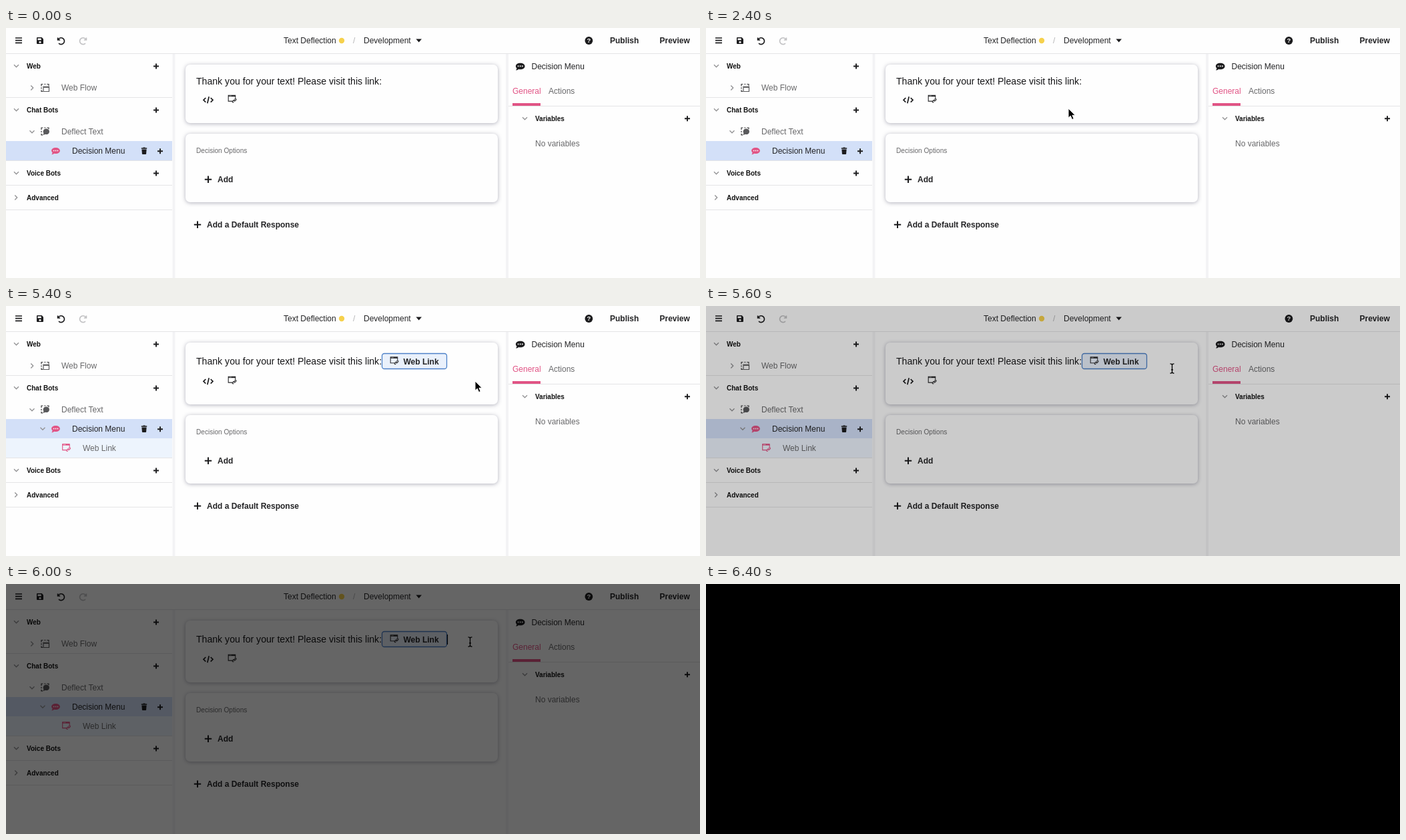
An HTML page for the animation above (6600 ms loop, 1040 by 376 pixels).

```html
<!DOCTYPE html>
<html lang="en">
<head>
<meta charset="utf-8">
<title>Bot builder</title>
<style>
html, body { margin: 0; width: 100%; height: 100%; overflow: hidden; background: #fefefe; }
svg { display: block; width: 1040px; height: 376px; font-family: "Liberation Sans", Arial, sans-serif; font-size: 12px; cursor: default; }
text { fill: #242426; white-space: pre; }
.b { font-weight: bold; }
.s { font-size: 10px; font-weight: bold; fill: #111; }
.g { fill: #68686a; }
.line { stroke: #e4e4e6; }
.card { fill: #fefefe; filter: drop-shadow(0 1px 3px rgba(40, 40, 70, .36)); }
</style>
</head>
<body>
<svg viewBox="0 0 1040 376">
  <defs>
    <g id="plus" fill="none" stroke="#1c1c1e" stroke-width="1.9"><path d="M-4 0H4M0-4V4"/></g>
    <g id="bigplus" fill="none" stroke="#1c1c1e" stroke-width="2"><path d="M-5.2 0H5.2M0-5.2V5.2"/></g>
    <path id="down" d="M-3.5-1.7 0 1.7 3.5-1.7" fill="none" stroke="#949496" stroke-width="1.4"/>
    <path id="right" d="M-1.7-3.5 1.7 0-1.7 3.5" fill="none" stroke="#949496" stroke-width="1.4"/>
    <g id="chat">
      <path d="M0-5C3.7-5 6.4-3.1 6.4-.5S3.7 4 0 4q-1.3 0-2.4-.3Q-4 5.2-6.3 5.2-5 3.8-4.9 2.4-6.4 1.2-6.4-.5C-6.4-3.1-3.7-5 0-5Z" fill="currentColor"/>
      <path d="M-3.7-.5h1.6M-.8-.5H.8M2.1-.5h1.6" stroke="#fff" stroke-width="1.6"/>
    </g>
    <g id="dash" fill="none" stroke="#3c3c3e" stroke-width="1.2">
      <path d="M-6-2.6V-5.5H-3.6M-1.7-5.5H.5M2.3-5.5H5V-3.3M-6-.8V1.4M-6 3.2V5.3H-3.8"/>
    </g>
    <g id="link" fill="none" stroke="currentColor" stroke-width="1.1">
      <path d="M4.7-1V-5.3H-5.8V3.6H.4"/>
      <path d="M-5.8-4.4H4.7" stroke-width="2.2"/>
      <path d="M-4.3-4.5h1M-2.5-4.5h1" stroke="#fff" stroke-width=".8"/>
      <path d="M2.4 4.9 1.3 5.4Q-.1 5.3.3 3.8L1.9 2.1Q3.1 1.2 4 2.5M3.5.8 4.5-.1Q6.1-.2 5.9 1.4L4.4 3.1Q3.1 4.1 2.2 2.8"/>
    </g>
    <path id="curve" d="M-4.4-4.6V-1H-.8M-3.9-1.3A4.9 4.9 0 1 1-3 4" fill="none" stroke="currentColor" stroke-width="1.7"/>
  </defs>

  <rect width="1040" height="376" fill="#fefefe"/>
  <path d="M251.5 39V376M751 39V376" stroke="#f3f3f5" stroke-width="4"/>

  <!-- top bar -->
  <path class="line" d="M0 38.5H1040"/>
  <path d="M14 15H24M14 18.7H24M14 22.4H24" stroke="#1c1c1e" stroke-width="1.7"/>
  <path d="M47 14H53.6L56 16.4V23q0 1-1 1H47q-1 0-1-1V15q0-1 1-1Z" fill="#1c1c1e"/>
  <path d="M47.5 15.5H52.7V18.2H47.5Z" fill="#fefefe"/><circle cx="51" cy="21.2" r="1.5" fill="#fefefe"/>
  <use href="#curve" x="82" y="19" color="#1c1c1e"/>
  <use href="#curve" transform="translate(116 19)scale(-1 1)" color="#c2c2c4"/>
  <text x="416" y="23">Text Deflection</text>
  <circle cx="503" cy="19" r="4.2" fill="#f6d14c"/>
  <text x="520" y="23" style="fill:#b4b4b6">/</text>
  <text x="536" y="23">Development</text>
  <path d="M614.4 16.5H623L618.7 21.5Z" fill="#1c1c1e"/>
  <circle cx="873.4" cy="19" r="5.9" fill="#1c1c1e"/>
  <text class="b" x="873.4" y="22.4" text-anchor="middle" style="fill:#fff;font-size:9.5px">?</text>
  <text class="b" x="905" y="23">Publish</text>
  <text class="b" x="979.5" y="23">Preview</text>

  <!-- tree -->
  <use href="#down" x="15.5" y="57"/><text class="s" x="31" y="61">Web</text><use href="#plus" x="225" y="57.5"/>
  <use href="#right" x="39" y="90"/>
  <use href="#dash" x="59" y="90"/>
  <path d="M56 88H64.5V95.5H56ZM56 89.3H64.5" fill="none" stroke="#5c5c5e" stroke-width="1.2"/>
  <text class="g" x="83" y="94">Web Flow</text>
  <path class="line" d="M0 104.5H249"/>
  <use href="#down" x="15.5" y="123"/><text class="s" x="31" y="127">Chat Bots</text><use href="#plus" x="225" y="123.5"/>
  <use href="#down" x="39" y="156"/>
  <use href="#dash" x="59" y="155.5"/>
  <path d="M60.4 151.5a4.5 4.3 0 1 1-1.8 8.2q-1.5 1.3-3.4 1.1 1-1 1.2-2.5a4.4 4.3 0 0 1 4-6.8Z" fill="#59595b"/>
  <text class="g" x="83" y="160">Deflect Text</text>
  <rect y="170" width="249" height="29" fill="#d3e0f8"/>
  <use href="#chat" x="74.5" y="185" color="#e15485"/>
  <text x="99" y="189">Decision Menu</text>
  <path d="M202.8 181H211.2M205.5 180.2H208.5" stroke="#1c1c1e" stroke-width="1.3"/>
  <path d="M203.4 182.5H210.6L210.1 189.2Q210 190 209.2 190H204.8Q204 190 203.9 189.2Z" fill="#1c1c1e"/>
  <use href="#plus" x="231" y="185.2"/>
  <g id="child">
    <use href="#down" x="55" y="184.5"/>
    <rect y="199" width="249" height="29" fill="#edf4fd"/>
    <use href="#link" x="90.5" y="213" color="#e15485"/>
    <text class="g" x="115" y="218">Web Link</text>
  </g>
  <g id="lower">
    <path class="line" d="M0 199.5H249M0 236.5H249M0 273.5H249"/>
    <use href="#down" x="15.5" y="218"/><text class="s" x="31" y="222">Voice Bots</text><use href="#plus" x="225" y="218.5"/>
    <use href="#right" x="15" y="255"/><text class="s" x="31" y="259">Advanced</text>
  </g>

  <!-- message card -->
  <rect id="card" class="card" x="269" y="55" width="468" height="88" rx="7"/>
  <text id="msg" x="285" y="85" style="font-size:14.1px;fill:#161618">Thank you for your text! Please visit this link:</text>
  <g id="chip">
    <rect x="563.5" y="71.5" width="97" height="23" rx="3.5" fill="#eaf1fc" stroke="#4c80c8" stroke-width="1.3"/>
    <use href="#link" x="582" y="82.2" color="#333335"/>
    <text class="b" x="595.5" y="88">Web Link</text>
  </g>
  <path id="caret" d="M661.5 76V91" stroke="#000" stroke-width="1.2"/>
  <g id="body">
    <rect id="hot" x="321" y="90" width="36" height="36" rx="3" fill="#f7d4e0"/>
    <path d="M299.3 105 296 108.3 299.3 111.6M306.7 105 310 108.3 306.7 111.6M304.2 103.2 301.8 113.2" fill="none" stroke="#1c1c1e" stroke-width="1.7"/>
    <use id="tool" href="#link" x="339" y="106.5"/>
    <rect class="card" x="269" y="159" width="468" height="103" rx="7"/>
    <text class="g" x="285" y="188" style="font-size:10.1px">Decision Options</text>
    <use href="#bigplus" x="303" y="227.7"/><text class="b" x="317" y="232">Add</text>
    <use href="#bigplus" x="287" y="295.7"/><text class="b" x="301" y="300">Add a Default Response</text>
  </g>

  <!-- inspector -->
  <use href="#chat" transform="translate(770.7 58)scale(1.07)" color="#1c1c1e"/>
  <text x="787.5" y="62">Decision Menu</text>
  <text x="759" y="99" style="fill:#e15485">General</text>
  <text class="g" x="813" y="99">Actions</text>
  <path class="line" d="M753 117.5H1040"/>
  <rect x="759" y="113" width="42" height="4" fill="#e15485"/>
  <use href="#down" x="777.5" y="136"/><text class="s" x="793" y="140">Variables</text><use href="#plus" x="1021" y="136.3"/>
  <text class="g" x="793" y="178">No variables</text>

  <rect id="dim" width="1040" height="376"/>

  <g id="pointer">
    <path id="arrow" d="M0 0V14.2L3.3 11.2 5.6 16.6 8.2 15.5 5.9 10.3H10.2Z" fill="#000" stroke="#fff" stroke-width="1"/>
    <path id="hand" d="M0 1.3Q.2-.4 1.6-.4 3-.3 3.1 1.2L3.6 5.2Q5.4 4 6.2 5.7 8-.1 8.7 6.4 11 5.3 11.2 8V11Q11 13 9.9 14.2V16.4H3.2V14.7L-2.3 8.6Q-2.6 6.8-1 7.1L.9 8.6Z M5 10V13M7 10V13M9 10V13" transform="translate(1.5 .5)" fill="#fff" stroke="#111" stroke-width="1.1" stroke-linejoin="round"/>
    <path id="beam" d="M-3-7.2Q-.3-7.2 0-5.4 .3-7.2 3-7.2M0-5.5V5.5M-3 7.2Q-.3 7.2 0 5.4 .3 7.2 3 7.2M-1.5 1.8H1.5" fill="none" stroke="#000" stroke-width="1.3"/>
  </g>
</svg>
<script>
const LOOP = 6600, STEP = 200, CLICK = 3400;
// time, x, y of the pointer
const path = [
  [2200, 618, 166], [2400, 543, 121], [2600, 440, 112], [2800, 362, 109], [4000, 357, 109],
  [4200, 648, 138], [4400, 690, 119], [4600, 703, 113], [5400, 703, 113],
  [5600, 698.5, 94], [5800, 695.5, 88], [6000, 695.5, 87], [6600, 695.5, 87]
];
const $ = id => document.getElementById(id);
const show = (id, on) => $(id).setAttribute("visibility", on ? "inherit" : "hidden");
const move = (id, x, y) => $(id).setAttribute("transform", `translate(${x} ${y})`);

function at(t) {
  if (t <= path[0][0]) return path[0].slice(1);
  const i = path.findIndex(p => p[0] >= t);
  const [t0, x0, y0] = path[i - 1], [t1, x1, y1] = path[i];
  const k = (t - t0) / (t1 - t0);
  return [x0 + (x1 - x0) * k, y0 + (y1 - y0) * k];
}

function draw(t) {
  const added = t >= CLICK, hover = t >= 2800 && t <= 4000, typing = t >= 5600;
  show("child", added);
  show("chip", added);
  move("lower", 0, added ? 29 : 0);
  move("body", 0, added ? 5 : 0);
  $("card").setAttribute("height", added ? 93 : 88);
  $("msg").setAttribute("y", added ? 88 : 85);

  show("hot", hover);
  $("tool").setAttribute("color", hover ? "#d92f68" : "#29292b");
  show("caret", t >= 6000);

  $("pointer").setAttribute("visibility", t >= path[0][0] && t < 6400 ? "visible" : "hidden");
  show("arrow", !hover && !typing);
  show("hand", hover);
  show("beam", typing);
  move("pointer", ...at(t));

  $("dim").setAttribute("opacity", Math.min(1, Math.max(0, (t - 5400) / 1000)));
}

const start = performance.now();
function tick(now) {
  const t = Math.max(0, now - start) % LOOP;
  draw(Math.floor(t / STEP) * STEP);
  requestAnimationFrame(tick);
}
draw(0);
requestAnimationFrame(tick);
</script>
</body>
</html>
```
